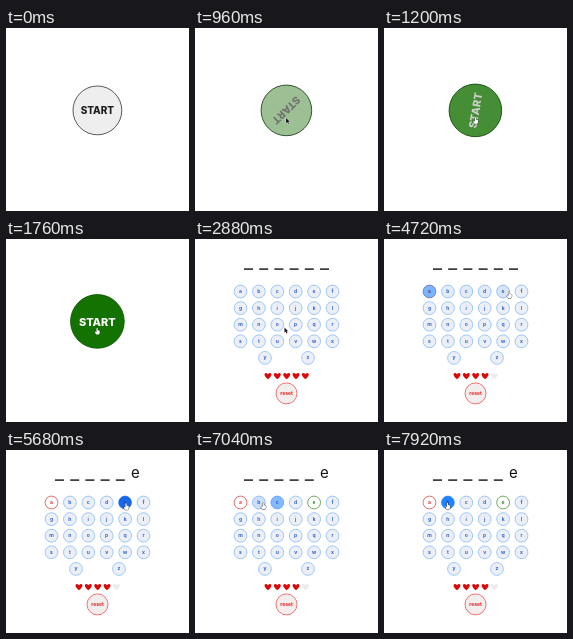
Animation, 183 px wide and 183 px high, one loop 8 s. Source, as an HTML page with a canvas:

```html
<!DOCTYPE html>
<html lang="en">
<head>
<meta charset="utf-8">
<title>Word guessing game</title>
<style>
  html, body { margin: 0; width: 100%; height: 100%; overflow: hidden; background: #fff; }
  canvas { display: block; width: 183px; height: 183px; }
</style>
</head>
<body>
<canvas></canvas>
<script>
const SIZE = 183, LOOP = 8000, GAME_START = 2080, HOVER_MS = 300;
const canvas = document.querySelector('canvas');
const ctx = canvas.getContext('2d');
const dpr = window.devicePixelRatio || 1;
canvas.width = canvas.height = SIZE * dpr;

const clamp = v => Math.max(0, Math.min(1, v));
const lerp = (a, b, p) => a + (b - a) * p;
const smooth = p => p * p * (3 - 2 * p);
const mix = (a, b, p) => a.map((v, i) => lerp(v, b[i], p));
const rgb = c => `rgb(${c.map(Math.round).join(',')})`;

// CSS "ease": cubic-bezier(.25, .1, .25, 1)
function ease(p) {
  if (p <= 0 || p >= 1) return clamp(p);
  const curve = (a, b, s) => 3 * a * s * (1 - s) ** 2 + 3 * b * s * s * (1 - s) + s ** 3;
  let low = 0, high = 1;
  for (let i = 0; i < 20; i++) {
    const mid = (low + high) / 2;
    if (curve(.25, .25, mid) < p) low = mid; else high = mid;
  }
  return curve(.1, 1, low);
}

// Pointer stops: time, x, y
const path = [
  [160, 78, 172], [520, 78, 172], [860, 91, 90], [1300, 91.5, 89.5],
  [2800, 89.5, 88.5], [3000, 89.5, 88.5], [3640, 45, 51.5], [4590, 45, 52],
  [4730, 126, 53], [4850, 136, 54], [4930, 136, 54], [5180, 120, 53.5],
  [6300, 120, 53.5], [7200, 63.5, 53], [8000, 63.5, 53]
];
function pointerAt(t) {
  const i = path.findIndex(stop => stop[0] > t);
  if (i < 1) return path[i < 0 ? path.length - 1 : 0].slice(1);
  const [t0, x0, y0] = path[i - 1], [t1, x1, y1] = path[i];
  const p = smooth((t - t0) / (t1 - t0));
  return [lerp(x0, x1, p), lerp(y0, y1, p)];
}

const keys = [...'abcdefghijklmnopqrstuvwxyz'].map((letter, i) => ({
  letter,
  x: i < 24 ? 45.5 + 18.4 * (i % 6) : [70, 113][i - 24],
  y: 52.5 + 16.6 * Math.floor(i / 6)
}));
const guesses = {
  a: { time: 4320, color: [230, 50, 50] },
  e: { time: 5600, color: [50, 135, 25] }
};
const isOver = (key, t) => {
  const [x, y] = pointerAt(t);
  return t >= GAME_START && Math.hypot(x - key.x, y - key.y) < 6.6;
};
// Share of the last HOVER_MS spent over the key gives a linear fade
function hoverLevel(key, t) {
  let hits = 0;
  for (let i = 0; i < 20; i++) hits += isOver(key, t - i * HOVER_MS / 20);
  return hits / 20;
}

function disc(x, y, r, fill, stroke, width) {
  ctx.beginPath();
  ctx.arc(x, y, r, 0, 7);
  ctx.fillStyle = fill;
  ctx.fill();
  ctx.strokeStyle = stroke;
  ctx.lineWidth = width;
  ctx.stroke();
}
function label(text, x, y, font, color) {
  ctx.font = `${font} Inter, sans-serif`;
  ctx.textAlign = 'center';
  ctx.fillStyle = color;
  ctx.fillText(text, x, y);
}

function drawStart(t) {
  const p = ease((t - 725) / 1000);
  ctx.save();
  ctx.translate(91.4, 82.4);
  ctx.rotate(p * 2 * Math.PI);
  ctx.scale(1 + .1 * p, 1 + .1 * p);
  disc(0, 0, 24.4, rgb(mix([238, 238, 238], [20, 115, 0], p)),
    rgb(mix([50, 50, 50], [12, 88, 0], p)), .8);
  label('START', 0, 3.8, '800 10px', rgb(mix([30, 30, 30], [255, 255, 255], p)));
  ctx.restore();
}

function drawKey(key, t) {
  const guess = guesses[key.letter];
  const used = guess && t >= guess.time;
  const pressed = used && t < guess.time + 120;
  const level = hoverLevel(key, t);
  const blue = pressed ? [22, 104, 232] : [32, 130, 255];
  const fill = mix(used ? [255, 255, 255] : [236, 240, 246], blue, level);
  const edge = mix(used ? guess.color : [120, 178, 245], blue, level);
  const ink = mix(used ? guess.color : [48, 98, 210], [20, 80, 195], level);
  disc(key.x, key.y, 6.4, rgb(fill), rgb(edge), .7);
  label(key.letter, key.x, key.y + 1.5, '700 5px', rgb(ink));
}

function drawHeart(x, y, color) {
  ctx.beginPath();
  ctx.moveTo(x, y + 3.2);
  ctx.bezierCurveTo(x - 6.2, y - 1, x - 2.6, y - 5, x, y - 1.7);
  ctx.bezierCurveTo(x + 2.6, y - 5, x + 6.2, y - 1, x, y + 3.2);
  ctx.fillStyle = color;
  ctx.fill();
}

function drawGame(t) {
  const solved = t >= guesses.e.time;
  ctx.fillStyle = '#111';
  for (let i = 0; i < (solved ? 5 : 6); i++) ctx.fillRect(49 + 15.2 * i, 29.4, 9, 1.4);
  if (solved) label('e', 129.3, 28, '400 15px', '#111');
  keys.forEach(key => drawKey(key, t));
  for (let i = 0; i < 5; i++) {
    drawHeart(73 + 9.35 * i, 137, i === 4 && t >= guesses.a.time ? '#ececec' : '#dc0808');
  }
  disc(91.5, 154.4, 10.5, '#f2eeee', '#ef5050', .8);
  label('reset', 91.5, 156, '700 5px', '#e02020');
}

const arrow = new Path2D('M0 0V5.2L1.2 4.1L2 6L2.9 5.6L2.1 3.8H3.7Z');
const hand = new Path2D('M-.6 0Q0-.6.6 0V2L2.7 2.6V4.5L2 6.3H-1L-2.2 3.8L-1.6 3.2L-.6 4Z');
function drawPointer(t) {
  if (t < 160) return;
  const isHand = t < GAME_START ? t > 1200 : keys.some(key => isOver(key, t));
  ctx.save();
  ctx.translate(...pointerAt(t));
  ctx.lineJoin = 'round';
  ctx.lineWidth = isHand ? .7 : .8;
  ctx.strokeStyle = isHand ? '#222' : '#fff';
  ctx.fillStyle = isHand ? '#fff' : '#111';
  const shape = isHand ? hand : arrow;
  ctx.stroke(shape);
  ctx.fill(shape);
  ctx.restore();
}

function draw() {
  const t = performance.now() % LOOP;
  ctx.setTransform(dpr, 0, 0, dpr, 0, 0);
  ctx.fillStyle = '#fff';
  ctx.fillRect(0, 0, SIZE, SIZE);
  if (t < GAME_START) drawStart(t); else drawGame(t);
  drawPointer(t);
  requestAnimationFrame(draw);
}
draw();
</script>
</body>
</html>
```
